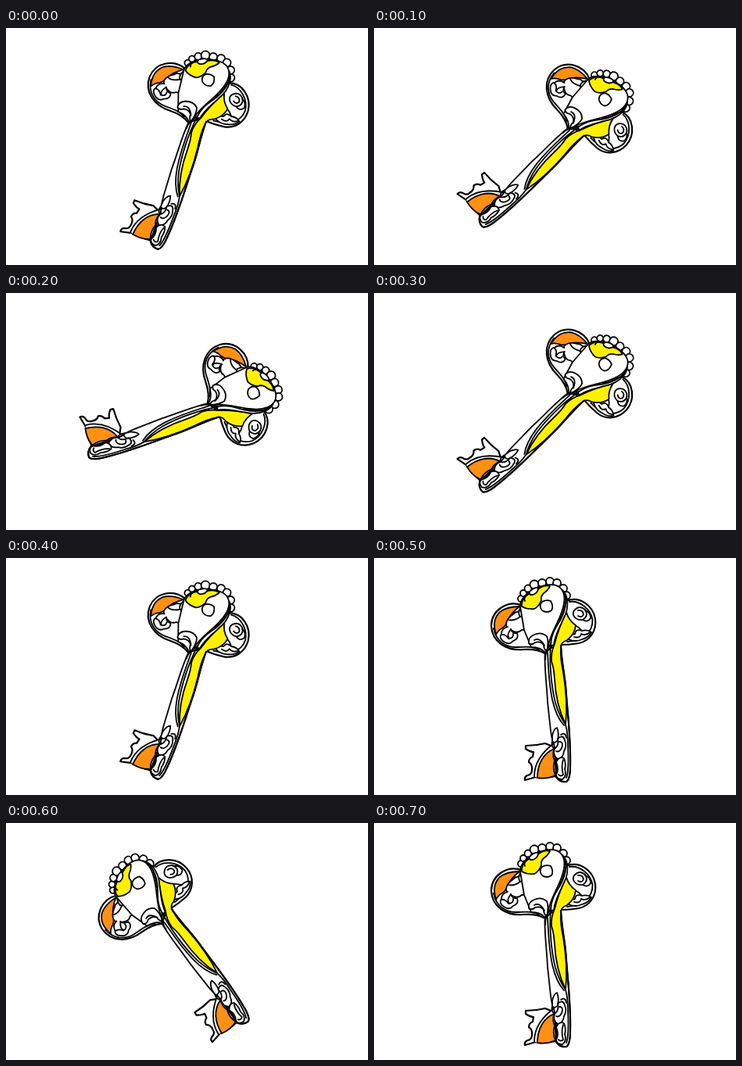
Write an HTML page that moves like this. It is 463 by 303 pixels and loops after 800 ms.

```html
<!DOCTYPE html>
<html lang="en">
<head>
<meta charset="utf-8">
<title>Swinging key</title>
<style>
html, body { margin: 0; width: 100%; height: 100%; overflow: hidden; background: #fff; }
svg { display: block; width: 100vw; height: 100vh; }
#key { fill: none; stroke: #000; stroke-width: 1.8; stroke-linecap: round; stroke-linejoin: round; }
.white { fill: #fff; }
.yellow { fill: #fff000; }
.orange { fill: #ff9013; }
.bold { stroke-width: 2.2; }
</style>
</head>
<body>
<svg viewBox="0 0 463 303">
<g id="key">
  <g id="bumps" class="white"></g>

  <!-- stem -->
  <path class="white" d="M219 117C217 136 221 160 222 184L226 221Q228 236 234 252L233 280Q238 287 246 286Q251 283 251 266C252 235 248 202 246 175C245 153 240 135 239 112Z"/>

  <!-- left lobe -->
  <path class="white bold" d="M188 60C170 54 150 67 150 87C151 107 169 119 191 117C204 116 212 118 219 122L235 105L240 60Z"/>
  <path class="orange" d="M156 98C152 84 154 76 161 69Q170 62 186 62Q175 71 172 78Q169 86 165 89Q159 92 156 98"/>
  <path d="M153 90C156 106 168 114 181 114C192 114 201 112 211 117"/>
  <path class="white" d="M178 72Q170 77 169 84Q169 92 177 93Q184 97 189 92Q198 92 200 84Q202 75 194 71Q191 66 188 61Q188 68 183 69Q180 69 178 72"/>
  <path class="white" d="M188 62Q183 71 187 75Q193 77 194 70"/>
  <path d="M172 79Q179 81 187 75"/>
  <path class="white" d="M171 88Q163 90 163 97Q159 102 166 107Q173 112 178 106Q186 103 183 96Q177 97 175 91"/>
  <path d="M175 91Q169 99 173 103Q179 102 178 97M163 98Q168 97 172 103"/>

  <!-- right lobe -->
  <path class="white bold" d="M246 55C262 48 280 60 283 78C285 93 276 106 262 109Q250 111 240 111L232 105Z"/>
  <path d="M250 56C263 54 277 65 279.500 79C280 95 268 105 247 107"/>
  <path class="white" d="M257 66Q263 60 270 66Q275 74 267 79Q258 80 255 73Q254 69 257 66"/>
  <path d="M261 67Q267 66 268 72Q266 77 261 74M270 67Q277 69 277 77Q273 83 267 79"/>
  <path class="white" d="M249 104Q249 98 257 97Q258 90 266 93Q273 91 278 95Q274 102 266 104Q258 108 249 104"/>
  <path d="M256 101Q264 103 265 97Q271 100 276 95M257 86Q262 88 266 93"/>
  <path class="yellow" d="M246 69Q249 80 258 86C257 96 252 101 247 105Q238 108 239 116Q238 127 242 146C246 170 247 195 245 213C236 194 232 175 231 155Q230 140 227 132Q226 121 231 110Q235 92 246 69"/>

  <!-- dome -->
  <path class="white" d="M187 62C186 53 197 43 207 39C220 33 233 32 239 39C246 47 244 58 240 69C235 84 225 98 223 112L219 121Q213 114 201 114L192 92Z"/>
  <path class="yellow" d="M189 62C188 54 195 46 201 45Q207 44 211 39Q219 34 225 36Q222 42 217 45Q213 49 214 54Q211 62 205 65Q196 66 189 62"/>
  <path class="white" d="M199 43Q205 37 210 38Q210 45 203 47Q198 48 199 43"/>
  <path d="M193 55Q191 50 196 46"/>
  <path class="white" d="M215 56Q220 53 226 55Q230 62 227 67Q221 71 215 67Q210 61 215 56"/>
  <path class="white" d="M198 109Q197 101 205 98Q214 94 221 100Q224 107 221 120Q217 116 217 111Q213 106 206 108Q202 112 198 109"/>
  <path d="M205 105Q212 101 218 112"/>

  <!-- bands beside the dome -->
  <path class="white" d="M241 41C249 53 245 67 238 80C231 91 226 99 226 112L230 111C231 99 238 88 242 78Q249 66 247 53Q246 46 241 41"/>
  <path class="bold" d="M226 110Q218 120 219 130"/>

  <!-- stem edges -->
  <path class="bold" d="M239 112C240 135 245 153 246 175C248 202 252 235 251 266Q251 283 246 286Q238 287 233 280"/>
  <path d="M222 121C223 136 223 157 228 181Q233 203 243 214M226 112C224 135 227 165 232 185C236 199 240 206 245 213M245 213Q248 224 248 239C249 258 249 273 246 281"/>

  <!-- bit -->
  <path class="white bold" d="M219 237Q207 240 194 240L194 244Q200 248 204 248L203 254Q198 256 198 261Q203 264 202 271Q202 277 196 278Q192 280 193 284Q200 282 207 280Q218 282 233 279L231 242Z"/>
  <path class="white" d="M205 279C205 264 214 249 230 237L231 244C220 250 211 260 209 281"/>
  <path class="orange" d="M209 281C209 264 216 250 230 244Q228 254 231 259Q228 268 232 278Q221 283 209 281"/>

  <!-- lower petals -->
  <path class="white" d="M228 227Q230 218 234 217Q237 224 235 233Q231 238 228 234Z"/>
  <path class="white" d="M235 231Q242 225 244 233Q247 240 243 247Q242 256 235 257Q228 252 231 244Q237 240 235 231"/>
  <path d="M237 235Q243 235 240 243Q237 249 233 247M228 234Q226 241 231 244M239 226Q245 222 246 230"/>
  <path class="white" d="M233 261Q237 253 243 256Q246 263 244 270Q247 279 241 283Q233 283 233 277Q237 270 233 261"/>
  <path d="M242 258Q239 267 242 277Q239 280 236 277"/>
</g>
</svg>
<script>
const key = document.getElementById("key");
const pivot = [227, 159];

// Scalloped rim of the head: x, y, radius
const rim = [[188, 52, 4], [191, 45, 4], [197, 39, 4.5], [205, 34, 5.5], [215, 32, 5],
  [225, 30, 5], [234, 32, 5], [242, 39, 5], [246, 48, 5]];
document.getElementById("bumps").innerHTML =
  rim.map(([x, y, r]) => `<circle cx="${x}" cy="${y}" r="${r}"/>`).join("");

// Held poses: clockwise angle, then a small shift
const tilt = [23, -0.5, -0.5], low = [50.3, -2.5, -0.5], flat = [75, -3, 0];
const upright = [0, 0, 0], back = [-32, -0.5, -3];
const swing = [tilt, low, flat, low, tilt, upright, back, upright];

function draw(now) {
  const [angle, dx, dy] = swing[Math.floor(now / 100) % swing.length];
  key.setAttribute("transform", `translate(${dx} ${dy}) rotate(${angle} ${pivot})`);
}

function tick() {
  draw(performance.now());
  requestAnimationFrame(tick);
}
tick();
</script>
</body>
</html>
```
